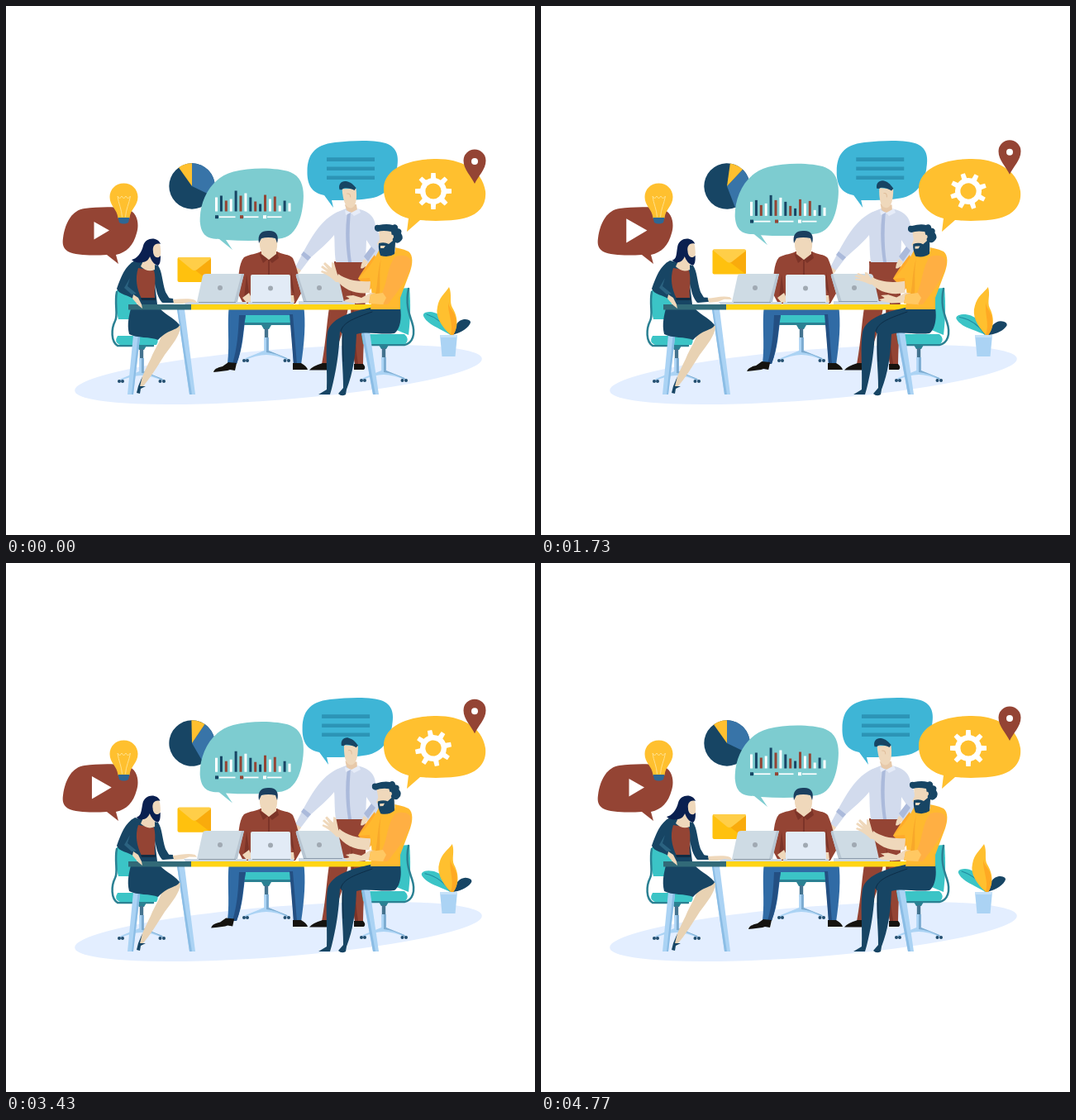
An HTML page for the animation above (4.81 s loop, 640 by 640 pixels).

```html
<!DOCTYPE html>
<html lang="en">
<head>
<meta charset="utf-8">
<title>Team meeting</title>
<style>
html, body { margin: 0; width: 100%; height: 100%; overflow: hidden; background: #fff; }
svg { display: block; width: 100vw; height: 100vh; }
.red { fill: #944434; } .navy { fill: #174564; } .ink { fill: #0a2050; }
.gold { fill: #ffc02f; } .teal { fill: #3bc4c6; } .skin { fill: #efd8bb; }
.sky { fill: #abd3f4; } .white { fill: #fff; } .black { fill: #15130f; }
.line { fill: none; stroke-linecap: round; stroke-linejoin: round; }
</style>
</head>
<body>
<svg viewBox="0 0 640 640">
<defs>
  <g id="base">
    <path fill="#2b8193" d="M-6 0H6L3 5H-3Z"/>
    <path fill="#44738f" d="M-2.2 4H2.2V18H-2.2Z"/>
    <path class="sky" d="M-2.8 15H2.8V31L25 40L27 43Q12 36 0 36Q-12 36-27 43L-25 40L-2.8 31Z"/>
    <path fill="#7cabd0" d="M0 15H2.8V31L25 40L26 42Q12 34 0 33Z"/>
    <g fill="#234e70"><circle cx="-27" cy="43" r="2"/><circle cx="-23" cy="43" r="2"/><circle cx="22.500" cy="43" r="2"/><circle cx="27" cy="43" r="2"/></g>
  </g>
  <path id="tooth" d="M-3.2-14L-2.700-22H2.700L3.200-14Z"/>
</defs>

<ellipse fill="#e3eeff" cx="329.500" cy="446" rx="247" ry="30.500" transform="rotate(-4.500 329.500 446)"/>

<!-- video bubble and bulb -->
<path class="red" d="M69 281C71 264 79 247 95 245C112 243 140 242 150 247C160 252 161 266 158 275C154 290 146 298 133 301L136 312L122 301C105 302 85 302 75 297C69 293 68 288 69 281Z"/>
<path id="play" class="white" d="M106.500 261L125 271.500L106.500 282.500Z"/>
<g id="rays" class="line" stroke="#ffc02f" stroke-width="2.300">
  <path d="M129.500 216L125 211.500M135.500 213.500L133 207.500M142 212.500V206M150 213.500L152 207.500M155.500 217L160 212.500"/>
</g>
<path class="gold" d="M142.500 214.500C152.500 214.500 159.500 222 159.500 231C159.500 242 150 246 149.500 257H135.500C135 246 125.500 242 125.500 231C125.500 222 132.500 214.500 142.500 214.500Z"/>
<path class="line" stroke="#ffe08a" stroke-width="1" d="M140.500 255C140 246 136 239 135 230L137.500 233L140 230L142.500 233L145 230L147.500 233L150.500 230C149 239 145 246 144.500 255"/>
<path fill="#2f6793" d="M135.500 256H149.500L148 262Q142.500 265 137 262Z"/>

<!-- pie -->
<g id="pie">
  <circle class="navy" cx="225" cy="218" r="27.700"/>
  <path fill="#3874a8" d="M225 218V190.300A27.700 27.700 0 0 1 250 230Z"/>
  <path class="gold" d="M225 218V190.300A27.700 27.700 0 0 0 209 195.400Z"/>
</g>

<!-- chart bubble -->
<path id="chartBubble" fill="#7dccd0" d="M234.700 261C234 236 247 208 275 200.500C297 195 328 195.500 344 201C359 207 361 222 359.500 238C357 262 349 278 334 281C314 284.500 289 284.500 266 283L274 295L258 282C242 282 236 276 234.700 261Z"/>
<g id="chart"></g>

<!-- note bubble -->
<g id="note">
  <path fill="#3eb5d6" d="M364.500 199C365 181 372 168 398 165C425 162 450 162 462 167C475 173 475 185 473 197C470 217 459 231 438 233C425 235 408 235 394 235L396 244L385 229C369 226 364 215 364.500 199Z"/>
  <path fill="#2c94b6" d="M388 183.300H446V187.900H388ZM388 194.500H446V199H388ZM388 205.600H446V210H388Z"/>
</g>

<!-- settings bubble and pin -->
<path class="gold" d="M457 221C457 200 480 186 518 185C547 184 576 196 580 224C582 244 568 256 545 258.500C527 260.500 511 260 501 259L485 273L487 257C469 252 457 240 457 221Z"/>
<g id="gear" class="white"><circle cx="517" cy="224" r="12.800" fill="none" stroke="#fff" stroke-width="6.400"/></g>
<g id="pin">
  <path class="red" d="M567 215C563 206 553.500 198 553.500 187A13.300 13.300 0 0 1 580.500 187C580.500 198 571 206 567 215Z"/>
  <circle class="white" cx="567" cy="188" r="4"/>
</g>

<g id="mail">
  <rect x="207.500" y="304" width="40.500" height="30" rx="2" fill="#ffc10e"/>
  <path fill="#f9ab0c" d="M248 306V332Q248 333 247 333.500L228 319Z"/>
  <path fill="#ffce48" d="M208 305Q208 304 210 304H246Q248 304 248 305.500L231 319Q228 321 225 319Z"/>
</g>

<!-- plant -->
<path id="leafDark" class="navy" d="M540 398C542 387 547 380 554 379C559 379 562 380 562 383C560 389 551 395 543 397Z"/>
<g id="leafTeal">
  <path class="teal" d="M539 398C538 383 527 371 513 370C507 370 504 372 505 375C509 385 525 390 538 398Z"/>
  <path class="line" stroke="#218aa0" stroke-width="1" d="M509 373Q528 379 537 397"/>
</g>
<g id="leafGold">
  <path class="gold" d="M538 398C527 388 519 376 522 364C524 352 531 348 536 340C540 349 536 358 540 365C545 373 549 386 541 398Z"/>
  <path fill="#ffa923" d="M538 398C542 384 534 372 535 358C536 366 540 367 543 374C546 383 545 393 541 398Z"/>
</g>
<path class="sky" d="M525 398H546L543.500 424H527.500Z"/>
<path fill="#c5e1f8" d="M525 398H546L545.700 401H525.300Z"/>

<!-- standing man -->
<g>
  <path class="red" d="M397 309H434C437 330 434 370 432 433H422C417 400 418 370 416 350C413 375 408 400 391 434H382C388 400 388 380 392 360C395 340 398 325 397 309Z"/>
  <path fill="#7c3428" d="M417 338C420 365 417 400 422 433H426C421 405 423 370 417 338Z"/>
  <path class="black" d="M383 432H391L388 440.500H367Q370 436 383 432ZM421 433H432Q436 437 433 440H421Z"/>
  <path fill="#d2dbed" d="M404 248L414 244L428 246C440 249 446 256 447 266C454 280 457 293 452 299L438 313L430 306L442 292L436 283L435 310H399C397 295 398 285 397 277C389 287 378 296 369 304L356 321L350 316L360 297C371 277 383 256 404 248Z"/>
  <path fill="#abbadb" d="M413 250L417 249C415 270 415 290 418 310H414C411 290 410 270 413 250ZM360 297L369 304L365 308L357 301ZM442 291L447 296L438 309L433 303Z"/>
  <path class="skin" d="M351 316L357 320L353 325L351 321L344 321L345 318ZM433 306L438 310C435 316 431 319 429 317L430 312Z"/>
  <g id="head2">
    <path fill="#e7c9a9" d="M410 240H424L425 247Q418 253 412 247Z"/>
    <path class="skin" d="M407 221H424C425 232 424 241 419 244C413 246 408 240 407 221Z"/>
    <path class="navy" d="M404 222C402 215 407 211 412 212C418 213 421 217 424 220L422 223C416 220 409 219 407 222Z"/>
    <path class="line" stroke="#dfbd9a" stroke-width="1" d="M413 227Q417 226 417 231"/>
  </g>
  <path fill="#e6ecf8" d="M410 247L418 250L427 245L429 250L421 254L417 250L411 253Z"/>
</g>

<!-- man at the middle laptop -->
<path class="teal" d="M286 372H347Q350 380 346 385H288Q284 380 286 372Z"/>
<path fill="#2b8193" d="M287 383H347V386H287Z"/>
<use href="#base" x="315" y="386"/>
<path fill="#306ba5" d="M270 362H360C363 382 361 408 357 434H348C347 410 345 392 344 374H290C287 395 287 413 279 433H268C271 407 267 384 270 362Z"/>
<path fill="#234f82" d="M282 374L290 374C286 395 286 414 279 433H274C280 413 281 395 282 374ZM343 373H347L352 434H348Z"/>
<path id="shoe" class="black" d="M269 431L279 432L277 441L271 440L268 441L251 443Q252 438 262 436Z"/>
<path class="black" d="M347 432H357Q364 436 365 440H347Z"/>
<path class="red" d="M279 345C282 328 281 312 288 304C295 300 304 300 308 297H328C334 301 343 300 347 305C353 318 355 332 358 346L350 360H287Z"/>
<path fill="#7c3428" d="M306 299L317 306L328 298L330 305L322 311L317 306L311 311ZM317 307H319V325H317ZM291 325L294 347L288 354ZM345 322L349 350L344 340Z"/>
<path class="skin" d="M309 294H327V300L318 307L309 300ZM286 353L294 347L299 357L291 359ZM342 350L348 350L349 359H342Z"/>
<path class="skin" d="M307 283Q318 275 328 283C329 295 326 303 318 304C310 303 306 295 307 283Z"/>
<path fill="#1b3f5f" d="M306 287C304 276 309 272 317 272C326 271 331 277 328 287L326 281Q317 279 309 281Z"/>

<!-- laptops -->
<path fill="#cedbe4" d="M242 324H288L279 358H231L238 326Q239 324 242 324ZM353 324H398Q401 324 402 327L409 358H360L351 327Q350 324 353 324Z"/>
<path fill="#b8c6d2" d="M285 324H288L280 358H276ZM351 327Q350 324 353 324L364 358H360Z"/>
<path fill="#e2ebf6" d="M298 325H342Q344 325 344 327L345 358H296V327Q296 325 298 325Z"/>
<g fill="#a0a9b2"><circle cx="259" cy="341" r="3"/><circle cx="320" cy="341.500" r="3"/><circle cx="379" cy="341" r="3"/></g>
<path fill="#ccd8e5" d="M215 358H291V361H217ZM293 358H348V361H293ZM354 357H422V361H354Z"/>
<path fill="#8a9aab" d="M233 358H278V359H233ZM298 358H344V359H298ZM360 357H407V358H360Z"/>

<!-- woman -->
<path class="teal" d="M134 344Q146 341 157 350L161 379H136Q131 363 134 344Z"/>
<path class="line" stroke="#2b8193" stroke-width="2.500" d="M134 346C131 360 136 374 132 381C127 391 127 406 135 411H178"/>
<path class="teal" d="M135 399H181Q186 404 182 410H138Q130 407 135 399Z"/>
<use href="#base" x="164" y="411"/>
<path class="sky" d="M157 367H166L154 470H147ZM207 367H216L229 470H222Z"/>
<path fill="#8bbde5" d="M163 367H166L154 470H152ZM207 367H209L225 470H222Z"/>
<path fill="#ffd415" d="M224 361H452V367.500H224Z"/>
<path fill="#e8d2b3" d="M190 388L211 387C211 398 201 410 192 422C183 436 175 450 164 462L161 465C162 452 169 439 175 427C181 412 190 402 190 388Z"/>
<path class="navy" d="M165 448L160 460L158 468L162 469L163 463L169 460L162 460Z"/>
<path class="navy" d="M152 362L182 361C190 373 202 376 210 386C207 393 197 390 184 404C175 400 158 402 149 397C146 384 149 374 152 362Z"/>
<path fill="#326a78" d="M148 361H224V367.500H148Z"/>
<path class="navy" d="M156 308L184 314C189 321 189 334 193 346L199 356L189 359C183 352 182 344 180 336L183 361H160L159 357C147 349 136 349 134 342C139 328 144 314 156 308Z"/>
<path class="red" d="M160 317L179 320C182 330 179 345 180 354H164C158 342 156 329 160 317Z"/>
<path fill="#102c43" d="M163 353H181V356H164Z"/>
<path class="skin" d="M154 349L160 353L164 361L165 366L160 362L153 354Z"/>
<path fill="#2b6280" d="M150 329L147 339L158 348L152 349L143 341Z"/>
<g id="typing">
  <path class="navy" d="M188 352L202 354L204 359L190 359Z"/>
  <path class="skin" d="M202 355C211 355 220 353 229 356L231 359L222 358L214 360H203Z"/>
</g>
<g id="head1">
  <path class="skin" d="M169 302H180L180 319Q171 323 163 315Z"/>
  <path class="skin" d="M175 285Q187 282 187 294C188 303 186 308 180 307C174 304 171 293 175 285Z"/>
  <path id="hair" class="ink"/>
</g>

<!-- bearded man -->
<path class="teal" d="M474 342L488 341C490 362 489 380 487 398L470 391Z"/>
<path class="line" stroke="#2b8193" stroke-width="2.500" d="M487 342C483 361 488 373 491 382C496 397 492 408 482 410H442"/>
<path class="teal" d="M430 397H482Q489 403 483 409H432Z"/>
<use href="#base" x="457" y="410"/>
<path class="sky" d="M430 394H440L451 470H444Z"/>
<path fill="#8bbde5" d="M430 394H433L447 470H444Z"/>
<path class="navy" d="M441 365H477C479 377 477 391 470 396C453 398 436 393 424 397C423 421 420 444 412 464L411 470Q406 473 402 469L408 462C408 439 405 419 407 397L404 393C403 421 399 443 394 463L392 470H378L388 464C389 439 386 416 389 394C394 376 422 369 441 365Z"/>
<path class="line" stroke="#0d2d47" stroke-width="1" d="M443 370C424 377 407 382 405 394M407 397L408 430"/>
<path fill="#ffaa2b" d="M446 301C438 311 430 322 426 330L440 344L454 325Z"/>
<g id="arm">
  <path class="skin" d="M441 333L440 347C425 349 408 344 400 331L402 324C411 331 425 334 441 333Z"/>
  <path id="palm" class="skin" d="M399 334C391 326 387 325 381 322L382 320L389 322L381 316L383 314L390 319L384 312L386 310L394 317L394 310L397 311L401 325L405 334Z"/>
</g>
<path fill="#ffb92f" d="M452 294C462 290 476 292 487 297C493 302 492 312 489 321L477 353V367H441C444 350 442 341 440 329L426 330Q442 315 452 294Z"/>
<g id="hand">
  <path class="skin" d="M441 347L457 349L457 361L440 359L424 360L412 358L409 356L416 354L411 351L420 350L430 353Z"/>
</g>
<path fill="#ffaf43" d="M471 303C481 300 490 302 490 311C489 326 475 344 462 361L439 360L441 349L455 347C462 333 461 315 471 303Z"/>
<path fill="#f8a82a" d="M454 305C449 322 450 336 447 349L452 348C453 332 451 321 454 305Z"/>
<path fill="#ffc862" d="M441 349L456 347L460 353L456 361L439 360Z"/>
<g id="head3">
  <path class="skin" d="M451 271H472L471 297L463 301L455 293L449 288L452 282Z"/>
  <path class="navy" d="M446 267Q447 264 451 265Q461 263 468 265C471 263 475 266 474 269Q480 270 478 275Q482 281 477 285Q474 288 471 286L470 300Q463 305 453 302Q450 294 451 287Q458 285 463 288L468 284L466 273Q456 271 450 273Q445 272 446 267Z"/>
  <path class="skin" d="M465 278Q469 275 469 280Q467 284 464 282ZM453 290H459L457 293H453Z"/>
</g>
</svg>

<script>
const LOOP = 4810;
const $ = id => document.getElementById(id);
const ease = u => (1 - Math.cos(Math.PI * u)) / 2;

// Out-and-back sway that turns round at `peak`.
const sway = (t, peak) => ease(t < peak ? t / peak : (LOOP - t) / (LOOP - peak));

// Eased value between [time, value] steps.
function track(steps, t) {
  const i = Math.max(1, steps.findIndex(s => s[0] >= t));
  const [t0, a] = steps[i - 1], [t1, b] = steps[i];
  return a + (b - a) * ease((t - t0) / (t1 - t0));
}

const PEAK = 2450;
const ARM = [[0, 0], [630, -3], [1330, -6], [2170, -6], [2930, 4], [3970, 4], [LOOP, 0]];
const PALM = [[0, 1], [630, 0.95], [1330, 0.65], [2170, 0.65], [2930, 1], [3970, 1], [LOOP, 1]];
const RAYS = [[0, 0], [1700, 0], [2050, 1], [2450, 1], [2800, 0], [LOOP, 0]];

const move = (id, x, y) => $(id).setAttribute('transform', `translate(${x} ${y})`);
const turn = (id, deg, x, y) => $(id).setAttribute('transform', `rotate(${deg} ${x} ${y})`);
const scale = (id, sx, sy, x, y) =>
  $(id).setAttribute('transform', `translate(${x} ${y}) scale(${sx} ${sy}) translate(${-x} ${-y})`);

function buildChart() {
  const color = { w: '#fff', n: '#174564', r: '#944434' };
  const rect = (x, y, w, h, c) => `<rect x="${x}" y="${y}" width="${w}" height="${h}" fill="${color[c]}"/>`;
  const heights = [17, 19, 13, 15, 25, 19, 22, 17, 12, 9, 20, 15, 18, 7, 13, 10];
  let out = heights.map((h, i) => rect(253 + i * 5.9, 248.5 - h, 3, h, 'wnrwnrwnrnrwrwnw'[i])).join('');
  [['n', 253], ['r', 283], ['w', 311]].forEach(([c, x]) => {
    out += rect(x, 253.2, 4, 4, c) + rect(x + 5, 254.4, 17.5 + (c === 'n' ? 2 : 0), 1.7, 'w');
  });
  $('chart').innerHTML = out;
}

function buildGear() {
  for (let a = 0; a < 360; a += 45)
    $('gear').innerHTML += `<use href="#tooth" transform="translate(517 224) rotate(${a})"/>`;
}

function draw(t) {
  const s = sway(t, PEAK), late = sway(t, 2550);
  const nod = ease(2 * (t / (LOOP / 2) % 1));

  scale('play', 1 + 0.45 * s, 1 + 0.45 * s, 115.5, 271.7);
  const glow = track(RAYS, t);
  scale('rays', 0.8 + 0.2 * glow, 0.8 + 0.2 * glow, 142.5, 231);
  $('rays').setAttribute('opacity', glow);

  turn('pie', 54 * s, 225, 218);
  move('chartBubble', 0, -7.3 * s);
  move('chart', 0, 6.7 * s);
  move('note', -8.8 * late, 0);
  // The gear keeps turning one way, easing through a rest halfway.
  turn('gear', t < PEAK ? 90 * s : 180 - 90 * s, 517, 224);
  move('pin', 0, -14 * s);
  move('mail', 0, -12.5 * late);

  turn('leafTeal', -8 * s, 538, 398);
  turn('leafGold', 6 * s, 538, 398);
  turn('leafDark', 9 * s, 538, 398);

  turn('head1', -2 * s, 176, 314);
  const tip = 152 + 9 * late;
  $('hair').setAttribute('d', `M187 288C184 279 169 279 166 290C164 299 ${tip + 6} 306 ${tip} 307
    C${tip + 3} 310 ${tip + 8} 311 165 310C170 310 173 306 174 303C176 308 179 313 184 314
    C187 312 187 306 187 302C183 307 178 303 178 297C177 291 180 286 187 288Z`);
  turn('typing', -7 * s, 190, 358);
  turn('head2', -1 + 8 * late, 418, 246);
  turn('head3', -6 * nod, 466, 300);
  move('shoe', -3 * nod, -1.5 * nod);

  turn('arm', track(ARM, t), 438, 341);
  scale('palm', 1, track(PALM, t), 402, 331);
  turn('hand', 4 * Math.sin(t / LOOP * 8 * Math.PI), 448, 355);
}

buildChart();
buildGear();
const start = performance.now();
function tick(now) {
  draw(Math.max(0, now - start) % LOOP);
  requestAnimationFrame(tick);
}
draw(0);
requestAnimationFrame(tick);
</script>
</body>
</html>
```
